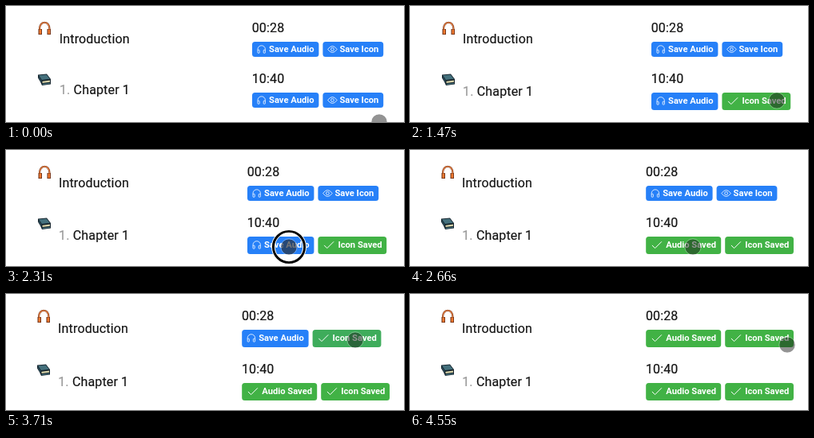
Write an HTML page with a canvas that moves like this. It is 498x146 px and loops after 5040 ms.

```html
<!DOCTYPE html>
<html lang="en">
<head>
<meta charset="utf-8">
<title>Save buttons</title>
<style>
  html, body { margin: 0; width: 100%; height: 100%; overflow: hidden; background: #fff; }
  canvas { display: block; width: 498px; height: 146px; }
</style>
</head>
<body>
<canvas id="stage"></canvas>
<script>
const W = 498, H = 146, LOOP = 5040, TICK = 70;
const canvas = document.getElementById('stage');
const ctx = canvas.getContext('2d');
const dpr = window.devicePixelRatio || 1;
canvas.width = W * dpr;
canvas.height = H * dpr;

const BLUE = [38, 128, 248], GREEN = [65, 178, 69];
const INK = '#151515', MUTED = '#999';
const GAP = 5;

// Pointer stops: time, x, y
const PATH = [
  [0, 467, 146], [350, 460, 121.5], [420, 460, 121.5], [560, 459, 119],
  [1680, 459, 119], [2240, 354, 122], [2800, 354, 122], [3290, 437, 58],
  [3710, 437, 58], [4060, 341, 57], [4270, 341, 57], [4550, 472, 64]
];
const PRESS = 140, FADE = 160;
const CLICKS = { icon2: 1050, audio2: 2310, icon1: 3430, audio1: 4130 };

const clamp = v => Math.min(1, Math.max(0, v));
const ease = p => p * p * (3 - 2 * p);
const mix = (a, b, p) => a + (b - a) * p;

function pointerAt(t) {
  for (let i = 1; i < PATH.length; i++) {
    const [t0, x0, y0] = PATH[i - 1], [t1, x1, y1] = PATH[i];
    if (t <= t1) {
      const p = ease((t - t0) / (t1 - t0));
      return [mix(x0, x1, p), mix(y0, y1, p)];
    }
  }
  return PATH[PATH.length - 1].slice(1);
}

function text(str, x, y, color = INK) {
  ctx.font = '16px Roboto, sans-serif';
  ctx.letterSpacing = '0.15px';
  ctx.fillStyle = ctx.strokeStyle = color;
  ctx.lineWidth = 0.2;
  ctx.fillText(str, x, y);
  ctx.strokeText(str, x, y);
}

function label(str, x, y) {
  ctx.font = 'bold 11.2px Roboto, sans-serif';
  ctx.letterSpacing = '0px';
  ctx.fillStyle = '#fff';
  ctx.fillText(str, x, y);
}

function shape(color, points) {
  ctx.beginPath();
  points.forEach(([x, y]) => ctx.lineTo(x, y));
  ctx.closePath();
  ctx.fillStyle = color;
  ctx.fill();
}

function at(x, y, draw) {
  ctx.save();
  ctx.translate(x, y);
  draw();
  ctx.restore();
}

function circle(x, y, r) {
  ctx.beginPath();
  ctx.arc(x, y, r, 0, Math.PI * 2);
}

function headphones() {
  for (const [color, width] of [['#7d3a1c', 2.2], ['#f0884a', 1.1]]) {
    ctx.beginPath();
    ctx.moveTo(2, 9);
    ctx.bezierCurveTo(2, -2, 14.5, -2, 14.5, 9);
    ctx.strokeStyle = color;
    ctx.lineWidth = width;
    ctx.stroke();
  }
  for (const x of [0.5, 11.5]) {
    ctx.fillStyle = '#6b3018';
    ctx.fillRect(x, 9, 4.5, 7);
    ctx.fillStyle = '#f07a30';
    ctx.fillRect(x + 1, 9.5, 2.6, 5.7);
  }
}

function book() {
  shape('#14222b', [[0, 1], [11, 0], [16, 6.5], [16, 13], [5, 14.5], [3, 10], [0, 5]]);
  shape('#44707c', [[1, 1.8], [10.6, 1], [15, 6.2], [4.8, 7.4]]);
  shape('#2f5361', [[0.9, 3], [4.3, 8.4], [4.3, 11], [0.9, 5]]);
  shape('#d6d2a8', [[5.5, 9.2], [15, 8], [15, 10.2], [5.5, 11.4]]);
  shape('#44707c', [[5.5, 12.4], [15, 11.2], [15, 12.4], [5.5, 13.7]]);
}

function earIcon() {
  ctx.beginPath();
  ctx.moveTo(0.8, 1.5);
  ctx.lineTo(0.8, 0);
  ctx.arc(5.5, 0, 4.7, Math.PI, 0);
  ctx.lineTo(10.2, 1.5);
  ctx.stroke();
  for (const x of [0.8, 8]) {
    ctx.beginPath();
    ctx.roundRect(x, 0.8, 2.2, 4, 0.8);
    ctx.stroke();
  }
}

function eyeIcon() {
  ctx.beginPath();
  ctx.moveTo(0, 0);
  ctx.quadraticCurveTo(5.8, -8, 11.6, 0);
  ctx.quadraticCurveTo(5.8, 8, 0, 0);
  ctx.stroke();
  circle(5.8, 0, 1.9);
  ctx.stroke();
}

function checkIcon() {
  ctx.beginPath();
  ctx.moveTo(0.7, 0.5);
  ctx.lineTo(4.4, 4.2);
  ctx.lineTo(12.7, -4.1);
  ctx.stroke();
}

const LABELS = {
  audio: { idle: 'Save Audio', saved: 'Audio Saved', icon: earIcon, w: 83.4, wSaved: 94 },
  icon: { idle: 'Save Icon', saved: 'Icon Saved', icon: eyeIcon, w: 75.8, wSaved: 85.8 }
};

// Draws one button and returns the x where the next one starts
function button(kind, x, y, h, age) {
  const spec = LABELS[kind], saved = age >= 0;
  const w = saved ? spec.wSaved : spec.w;
  const p = clamp(age / FADE);
  ctx.fillStyle = `rgb(${BLUE.map((c, i) => Math.round(mix(c, GREEN[i], p)))})`;
  ctx.beginPath();
  ctx.roundRect(x, y, w, h, 3.5);
  ctx.fill();
  const mid = y + (h > 20 ? 10.4 : 9.5);
  ctx.strokeStyle = '#fff';
  ctx.lineWidth = saved ? 1 : 0.8;
  at(x + (saved ? 7 : 6.2), mid, saved ? checkIcon : spec.icon);
  label(saved ? spec.saved : spec.idle, x + (saved ? 25 : 21), mid + 3.6);
  return x + w + GAP;
}

function buttons(x, y, h, ages) {
  const next = button('audio', x, y, h, ages[0]);
  button('icon', next, y, h, ages[1]);
}

function pointer(t) {
  const [x, y] = pointerAt(t);
  const pressed = Object.values(CLICKS).some(c => t >= c && t < c + PRESS);
  if (pressed) {
    circle(x, y, 19.6);
    for (const [color, width] of [['#fff', 4.8], ['#000', 2.9]]) {
      ctx.strokeStyle = color;
      ctx.lineWidth = width;
      ctx.stroke();
    }
  }
  circle(x, y, 9.8);
  ctx.fillStyle = pressed ? 'rgba(40,40,40,.64)' : 'rgba(20,20,20,.46)';
  ctx.fill();
  circle(x, y, 10.2);
  ctx.strokeStyle = 'rgba(255,255,255,.3)';
  ctx.lineWidth = 1;
  ctx.stroke();
}

function draw(t) {
  const age = name => t - CLICKS[name] - PRESS;
  const row1 = [age('audio1'), age('icon1')];
  const row2 = [age('audio2'), age('icon2')];
  const grown1 = row1.some(a => a >= 0), grown2 = row2.some(a => a >= 0);
  const step = row2.filter(a => a >= 0).length;
  const nameX = [66.4, 65.6, 64.7][step];
  const timeX = [308, 302, 295.2][step];
  const iconX = step === 2 ? 39 : 40;
  const drop = grown1 ? 3 : 0;

  ctx.setTransform(dpr, 0, 0, dpr, 0, 0);
  ctx.fillStyle = '#fff';
  ctx.fillRect(0, 0, W, H);

  at(iconX, 20, headphones);
  text('Introduction', nameX + 0.4, grown1 ? 49 : 47);
  text('00:28', timeX - 0.3, 33);
  buttons(timeX, 45, grown1 ? 22 : 19, row1);

  at(iconX, 85.5 + drop, book);
  const nameY = (grown2 ? 113 : 111) + drop;
  text('1.', nameX + 0.5, nameY, MUTED);
  text('Chapter 1', nameX + 18.2, nameY);
  text('10:40', timeX - 0.3, 97 + drop);
  buttons(timeX, 109 + drop, grown2 ? 22 : 19, row2);

  pointer(t);
}

const start = performance.now();
function frame() {
  const t = (performance.now() - start) % LOOP;
  draw(Math.floor(t / TICK) * TICK);
  requestAnimationFrame(frame);
}
frame();
</script>
</body>
</html>
```
